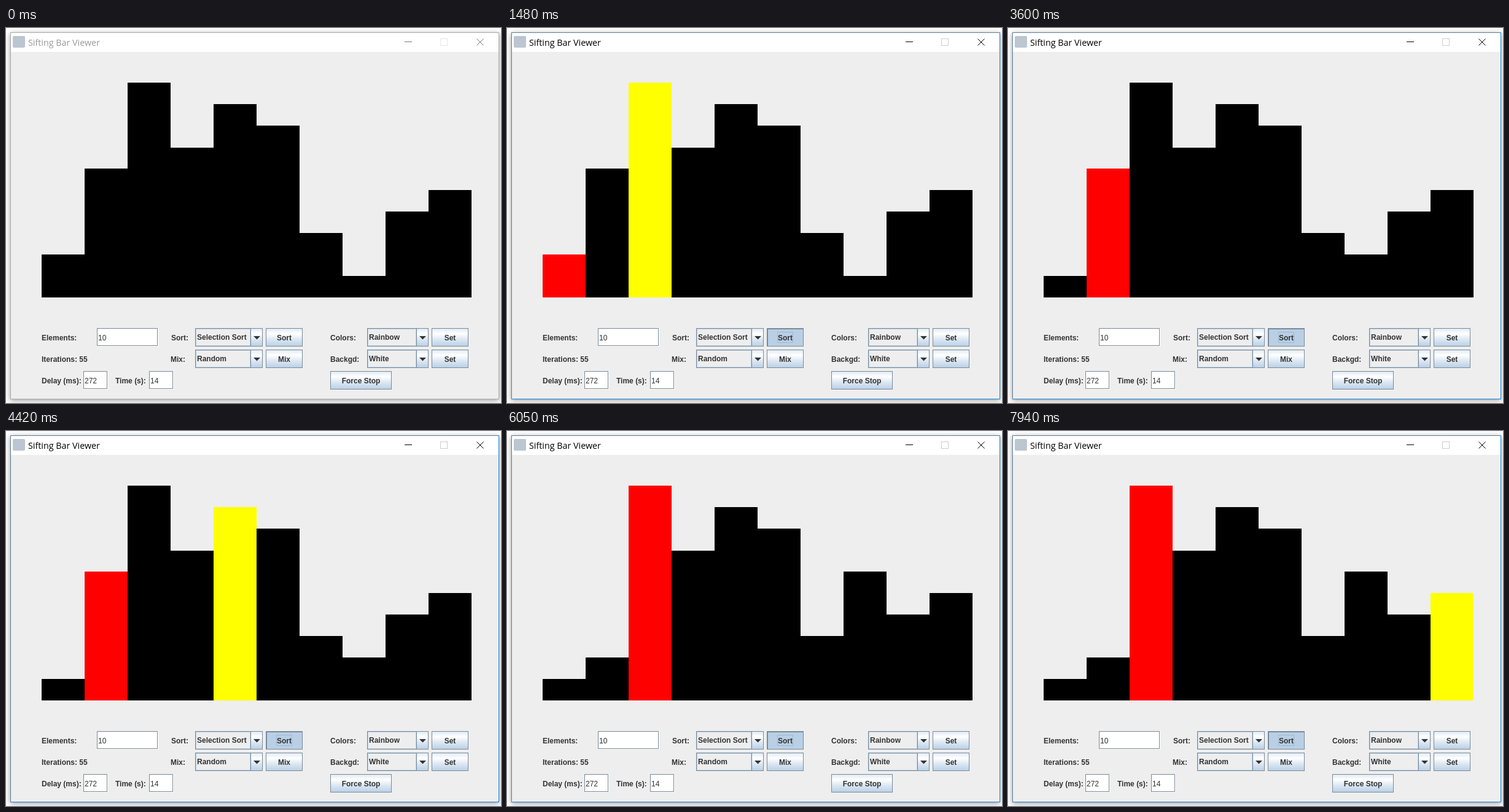
These frames come from a looping animation (806x611 px, 8000 ms). An HTML page:

```html
<!DOCTYPE html>
<html lang="en">
<head>
<meta charset="utf-8">
<title>Sifting Bar Viewer</title>
<style>
  html, body { margin: 0; width: 100%; height: 100%; overflow: hidden; background: #fff; }
  svg { display: block; width: 806px; height: 611px; }
  text { font: bold 12px "Liberation Sans", Arial, sans-serif; fill: #333; white-space: pre; }
  .plain { font-weight: normal; }
  .title { font: 14.3px "Open Sans", "Noto Sans", sans-serif; }
  .shadow { filter: drop-shadow(0 2px 4px rgba(0, 0, 0, .4)); }
  .line { fill: none; }
  .crisp { shape-rendering: crispEdges; }
</style>
</head>
<body>
<svg id="stage" viewBox="0 0 806 611" xmlns="http://www.w3.org/2000/svg">
  <defs>
    <linearGradient id="ocean" x1="0" y1="0" x2="0" y2="1">
      <stop offset="0" stop-color="#dde8f3"/>
      <stop offset=".3" stop-color="#fff"/>
      <stop offset=".6" stop-color="#dde8f3"/>
      <stop offset="1" stop-color="#b8cfe5"/>
    </linearGradient>
  </defs>
</svg>
<script>
const LOOP = 8000;
const PRESS = 800;
const STEP_TIMES = [
  920, 1200, 1480, 1740, 2020, 2250, 2530, 2810, 3090, 3370,
  3600, 3880, 4160, 4420, 4700, 4980, 5210, 5490, 5770,
  6050, 6330, 6560, 6840, 7120, 7380, 7660, 7940
];
const VALUES = [2, 6, 10, 7, 9, 8, 3, 1, 4, 5];
const BASE = 439, LEFT = 58, BAR = 70, UNIT = 35;
const EDGE = '#7a8a99', SOFT = '#b8cfe5';

const stage = document.getElementById('stage');

function set(node, attrs) {
  for (const key in attrs) node.setAttribute(key, attrs[key]);
  return node;
}

function add(tag, attrs, parent = stage) {
  const node = document.createElementNS('http://www.w3.org/2000/svg', tag);
  parent.appendChild(node);
  return set(node, attrs);
}

const rect = (x, y, width, height, fill, parent) =>
  add('rect', { x, y, width, height, fill, class: 'crisp' }, parent);

const frame = (x, y, width, height, stroke, parent) =>
  add('rect', { x: x + .5, y: y + .5, width: width - 1, height: height - 1, stroke, class: 'line crisp' }, parent);

function label(x, y, content, attrs = {}, parent) {
  const node = add('text', { x, y, ...attrs }, parent);
  node.textContent = content;
  return node;
}

function field(x, y, width, content) {
  rect(x, y, width, 30, '#fff');
  frame(x, y, width - 1, 29, EDGE);
  label(x + 2, y + 20, content, { class: 'plain' });
}

function button(x, y, width, content) {
  rect(x, y, width, 30, 'url(#ocean)');
  frame(x, y, width, 30, EDGE);
  label(x + width / 2, y + 20, content, { 'text-anchor': 'middle' });
}

function combo(x, y, width, content) {
  const split = width - 20;
  rect(x + split, y, 20, 30, 'url(#ocean)');
  frame(x, y, width, 30, EDGE);
  frame(x, y, split + 1, 30, EDGE);
  frame(x + 1, y + 1, split - 1, 28, SOFT);
  add('path', { d: `M${x + split + 5} ${y + 13}h11l-5.5 5.5z`, fill: '#333' });
  label(x + 3, y + 19, content);
}

// Window
add('rect', { x: 7, y: 7, width: 796, height: 598, fill: '#fff', class: 'shadow' });
rect(8, 39, 794, 565, '#eee');
const topLeft = add('path', { d: 'M7.5 605V7.5H803', class: 'line crisp' });
const bottomRight = add('path', { d: 'M802.5 8V604.5H8', class: 'line crisp' });
add('rect', { x: 11, y: 13, width: 20, height: 19, rx: 2, fill: '#bcc6d0' });
const title = label(36, 29, 'Sifting Bar Viewer', { class: 'title' });
const minimise = add('path', { d: 'M649 22.5h12', class: 'line crisp' });
const maximise = frame(707, 17, 12, 12, '#ccc');
const close = add('path', { d: 'M766.5 17.5l11 11m0 -11l-11 11', class: 'line' });

// Bars
const bars = VALUES.map((v, i) => rect(LEFT + i * BAR, 0, BAR, 0, '#000'));

// Controls
label(58, 509, 'Elements:');
label(58, 544, 'Iterations: 55');
label(58, 579, 'Delay (ms):');
label(178, 579, 'Time (s):');
label(269, 509, 'Sort:');
label(268, 544, 'Mix:');
label(528, 509, 'Colors:');
label(528, 544, 'Backgd:');
field(148, 489, 100, '10');
field(126, 559, 40, '272');
field(233, 559, 40, '14');
combo(308, 489, 110, 'Selection Sort');
combo(308, 524, 110, 'Random');
combo(588, 489, 100, 'Rainbow');
combo(588, 524, 100, 'White');
button(423, 489, 60, 'Sort');
button(423, 524, 60, 'Mix');
button(693, 489, 60, 'Set');
button(693, 524, 60, 'Set');
button(528, 559, 100, 'Force Stop');

const pressed = add('g', {});
rect(423, 489, 60, 30, SOFT, pressed);
frame(423, 489, 60, 30, EDGE, pressed);
rect(423, 489, 60, 2, EDGE, pressed);
rect(423, 489, 2, 30, EDGE, pressed);
frame(440, 495, 26, 18, '#a3b8cc', pressed);
label(453, 509, 'Sort', { 'text-anchor': 'middle' }, pressed);

// Selection sort, one state per step
function sortStates(count) {
  const list = [...VALUES];
  const states = [];
  for (let i = 0; states.length < count; i++) {
    let min = i;
    states.push({ list: [...list], red: i });
    for (let j = i + 1; j < list.length; j++) {
      states.push({ list: [...list], red: i, yellow: j });
      if (list[j] < list[min]) min = j;
    }
    [list[i], list[min]] = [list[min], list[i]];
  }
  return states;
}

const states = sortStates(STEP_TIMES.length);
const idle = { list: VALUES };

// The seventh height truncates one pixel short
const barHeight = v => v * UNIT - (v === 7 ? 1 : 0);

function draw(t) {
  const active = t >= PRESS;
  const ink = active ? '#000' : '#999';
  title.style.fill = ink;
  set(minimise, { stroke: active ? '#000' : '#777' });
  set(close, { stroke: active ? '#000' : '#777' });
  set(maximise, { stroke: active ? '#ccc' : '#e6e6e6' });
  set(topLeft, { stroke: active ? '#5f7d95' : '#aaa' });
  set(bottomRight, { stroke: active ? '#1883d7' : '#aaa' });
  set(pressed, { visibility: active ? 'visible' : 'hidden' });

  const step = STEP_TIMES.filter(time => time <= t).length - 1;
  const { list, red, yellow } = states[step] || idle;
  bars.forEach((bar, i) => {
    const height = barHeight(list[i]);
    const fill = i === red ? '#f00' : i === yellow ? '#ff0' : '#000';
    set(bar, { y: BASE - height, height, fill });
  });
}

const start = performance.now();
function tick() {
  draw((performance.now() - start) % LOOP);
  requestAnimationFrame(tick);
}
tick();
</script>
</body>
</html>
```
